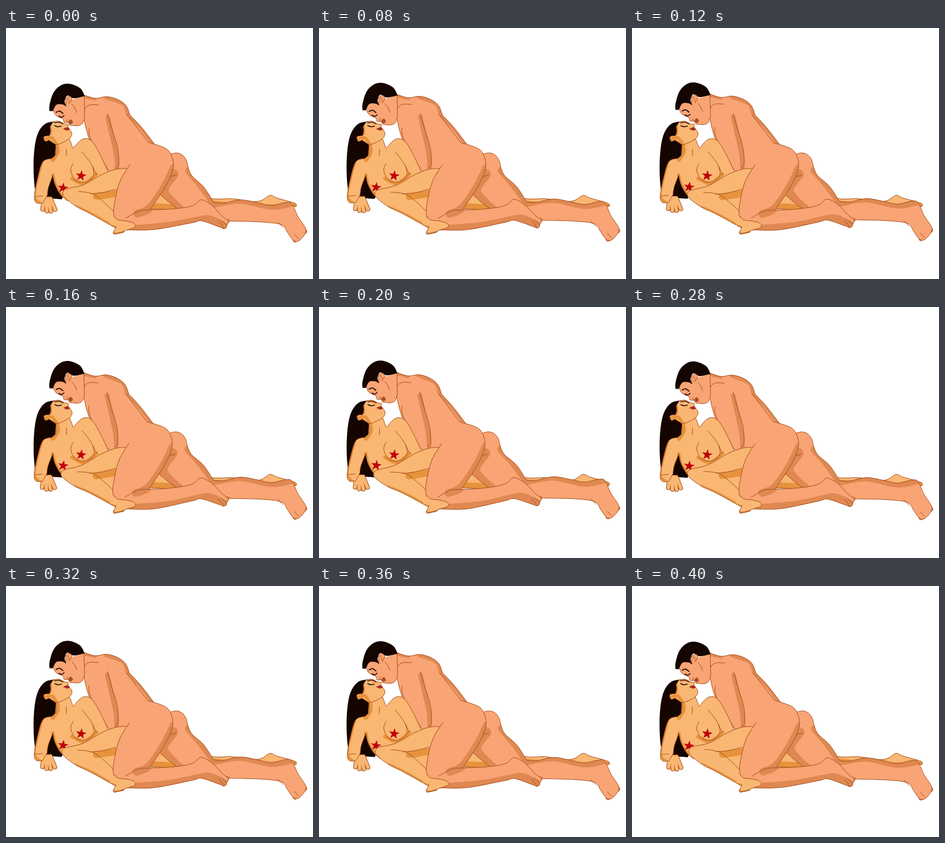
Animation of 550 by 450 pixels, one loop 440 ms. Source, as an HTML page with a canvas:

```html
<!DOCTYPE html>
<html lang="en">
<head>
<meta charset="utf-8">
<title>Loop</title>
<style>
html, body { margin: 0; width: 100%; height: 100%; overflow: hidden; background: #fff; }
canvas { display: block; }
</style>
</head>
<body>
<canvas id="stage" width="550" height="450"></canvas>
<script>
const ctx = document.getElementById('stage').getContext('2d');
const STEP = 40, STEPS = 11;
const MAN = { skin: '#f9a474', shade: '#df8852' };
const WOMAN = { skin: '#f9b773', shade: '#e7923c' };
const LINE = '#a34a16', HAIR = '#150500', RED = '#c00008';

// Each rule gives the shift of a point at full swing.
const bell = (d, width) => Math.exp(-((d / width) ** 2));
const rock = (x, y) => {
  const hip = bell(x - 260, 90);
  return [-3 * hip, 5 * hip - 4];
};
const recline = (x, y) => {
  const low = Math.max(0, Math.min(1, (y - 220) / 80)) * bell(x - 80, 45);
  return [0.5 - 1.5 * low, -2 * low];
};
const bend = (x, y) => {
  const knee = bell(Math.hypot(x - 103, y - 292), 50);
  return [-4 * knee, 4 * knee];
};

let swing = 0, shift = rock;

function place(x, y) {
  const [dx, dy] = shift(x, y);
  return { x: x + swing * dx, y: y + swing * dy };
}

// Smooth open curve through "x,y" points; "!" marks a corner.
function curve(text) {
  const pts = text.trim().split(/\s+/).map(token => ({
    ...place(...token.replace('!', '').split(',').map(Number)),
    corner: token.endsWith('!')
  }));
  const path = new Path2D();
  path.moveTo(pts[0].x, pts[0].y);
  for (let i = 1; i < pts.length; i++) {
    const a = pts[i - 1], b = pts[i];
    const before = a.corner ? a : pts[i - 2] || a;
    const after = b.corner ? b : pts[i + 1] || b;
    path.bezierCurveTo(a.x + (b.x - before.x) / 6, a.y + (b.y - before.y) / 6,
      b.x - (after.x - a.x) / 6, b.y - (after.y - a.y) / 6, b.x, b.y);
  }
  return path;
}

function fill(text, color) {
  ctx.fillStyle = color;
  ctx.fill(curve(text));
}

function stroke(path, color = LINE, width = 1) {
  ctx.strokeStyle = color;
  ctx.lineWidth = width;
  ctx.stroke(path);
}

const lines = (...list) => list.forEach(text => stroke(curve(text)));

// Shades are broad strokes kept inside the outline.
function part(tone, outline, ...shades) {
  const path = curve(outline);
  ctx.fillStyle = tone.skin;
  ctx.fill(path);
  ctx.save();
  ctx.clip(path);
  for (const [text, width] of shades) stroke(curve(text), tone.shade, width);
  ctx.restore();
  stroke(path);
}

function toes(tone, x1, y1, x2, y2, r) {
  for (let i = 0; i < 5; i++) {
    const { x, y } = place(x1 + (x2 - x1) * i / 4, y1 + (y2 - y1) * i / 4);
    ctx.beginPath();
    ctx.arc(x, y, r, 0, 7);
    ctx.fillStyle = tone.skin;
    ctx.fill();
    ctx.strokeStyle = LINE;
    ctx.lineWidth = 1;
    ctx.stroke();
  }
}

function fingers() {
  const path = new Path2D();
  for (let i = 0; i < 4; i++) {
    const root = place(68 + 4 * i, 306), tip = place(65.5 + 7.5 * i, 325 + 4 * Math.sin(i));
    path.moveTo(root.x, root.y);
    path.lineTo(tip.x, tip.y);
  }
  stroke(path, LINE, 8);
  stroke(path, WOMAN.skin, 6);
}

function star(x, y, r) {
  ctx.fillStyle = RED;
  ctx.beginPath();
  for (let i = 0; i < 10; i++) {
    const a = 0.14 + i * Math.PI / 5, d = i % 2 ? r * 0.4 : r;
    ctx.lineTo(x + d * Math.sin(a), y - d * Math.cos(a));
  }
  ctx.fill();
}

function farLegs() {
  shift = bend;
  part(WOMAN, `180,300! 310,295 371,306 405,306 440,311 458,309 473,300 486,305 517,314
    520,320! 400,325 310,326 240,324 180,326`,
    ['185,324 230,318 310,322', 10], ['372,314 450,321 520,319', 9]);
  shift = rock;
  toes(MAN, 518, 380, 535, 365, 4);
  part(MAN, `290,228! 304,224 315,227 323,237 327,252 334,266 355,286 372,313! 390,314 420,308
    450,313 475,318 500,313 512,315 523,338 537,360 534,372! 524,382 514,380 504,366 494,353
    460,348 397,346! 310,326! 294,314 277,299!`,
    ['300,262 282,290 296,312 312,327', 18], ['328,256 350,282 372,313', 14],
    ['372,316 420,309 475,320 512,314', 12]);
  lines('290,267 305,264', '487,348 497,358', '517,370 524,378');
}

function manTorso() {
  part(MAN, `136,119! 160,126 180,123 200,128 215,139 222,156! 242,177 266,208! 292,240!
    230,280! 180,253! 160,222 147,193 139,160!`,
    ['180,123 212,135 220,154', 10], ['222,156 245,180 268,210', 10],
    ['182,160 189,190 197,225 199,250', 8], ['141,123 160,127', 6]);
  lines('139,158 141,145 150,138 166,138', '182,154 191,185 200,215 202,244 196,252',
    '217,156 234,178 256,206', '149,180 152,200 182,253');
}

function manHead() {
  part(MAN, `84,139! 85,148 90,157 102,163 104,169 111,169! 114,174! 122,175 130,175 137,171
    141,160! 140,122!`);
  lines('118,137 123,143 127,152', '109,168 110,164');
  fill(`78,149! 78,138 85,116 98,103 114,100 133,108 141,122! 122,126 110,121 105,132
    108,140 101,137 90,138 84,149!`, HAIR);
  part(MAN, '108,136! 107,127 113,122 118,127 113,136', ['110,126 114,134', 3]);
  stroke(curve('90,151 96,149 102,153'), HAIR, 1.8);
  stroke(curve('95,158 100,160 104,157'), HAIR, 1.6);
  fill('111,169! 116,164 120,169 116,173', '#a5502c');
}

function womanBody() {
  shift = recline;
  fill(`92,167! 70,172 56,192 50,227 50,270 54,304! 100,307! 107,292! 88,234! 90,190!`, HAIR);
  fingers();
  part(WOMAN, `89,207! 89,226 82,234! 66,240 57,268 51,300 54,313 66,314! 74,300! 76,286
    84,264! 88,281 98,299 110,310! 190,290! 183,257! 157,207 138,199 120,216! 114,200 108,190!`,
    ['90,207 92,222 84,236', 8], ['84,264 88,281 100,302', 6],
    ['118,270 140,279 162,262', 6], ['64,242 57,268 51,302 62,315', 5]);
  lines('108,217 108,229', '120,243 116,256 125,273 142,276 157,265 155,248',
    '136,222 151,241 162,263', '53,302 66,301');
}

function womanHead() {
  part(WOMAN, `84,169! 94,167 105,172! 111,173 111,178! 114,182 118,189 114,198 98,207
    89,209! 77,201! 70,203 68,195 78,193! 80,185 79,177!`,
    ['71,199 82,197 90,208', 6], ['80,177 80,190', 4]);
  stroke(curve('87,170 95,169 102,172'), '#43180c', 1.4);
  stroke(curve('87,175 93,177 99,176'), HAIR, 1.5);
  fill('102,181! 110,178 114,182 109,184', '#a72c20');
}

function womanNearLeg() {
  shift = bend;
  part(WOMAN, `218,252! 198,253 171,263 139,281 110,288 103,292 104,302 126,320 151,333
    197,359! 195,340! 220,330!`,
    ['162,302 185,299 215,293', 12], ['126,321 160,338 197,360', 7]);
  lines('130,293 151,296 166,304 194,330', '151,297 173,295 197,289');
}

function manNearLeg() {
  shift = rock;
  toes(MAN, 390, 357, 397, 346, 3);
  part(MAN, `222,245! 205,273 196,305 193,335 204,352 217,362! 268,361 334,349 352,346
    390,359 396,353! 398,346 387,337 369,318 350,308 338,317 320,322 289,325 258,326!
    284,287 298,257 299,237 288,217 255,205!`,
    ['301,250 285,283 258,322 235,333', 14], ['205,362 290,355 340,346 365,343 396,358', 14]);
  lines('258,326 238,328 215,341', '381,347 389,356', '386,345 395,354');
}

function womanFoot() {
  shift = bend;
  toes(WOMAN, 195, 367, 209, 364, 3);
  fill('186,352! 190,337! 199,345! 202,356!', WOMAN.skin);
  part(WOMAN, '194,338! 200,344 215,346 229,350 231,357 217,362 203,367 193,367 197,357');
}

function draw(now) {
  const step = Math.floor(now / STEP) % STEPS;
  swing = Math.min(step, STEPS - 1 - step) / 5;
  ctx.fillStyle = '#fff';
  ctx.fillRect(0, 0, 550, 450);
  ctx.lineJoin = ctx.lineCap = 'round';
  farLegs();
  manTorso();
  manHead();
  womanBody();
  womanHead();
  star(102 + swing * 0.5, 287 - swing * 3, 10);
  star(134.5, 265, 10);
  womanNearLeg();
  manNearLeg();
  womanFoot();
}

const start = performance.now();
function tick() {
  draw(performance.now() - start);
  requestAnimationFrame(tick);
}
tick();
</script>
</body>
</html>
```
